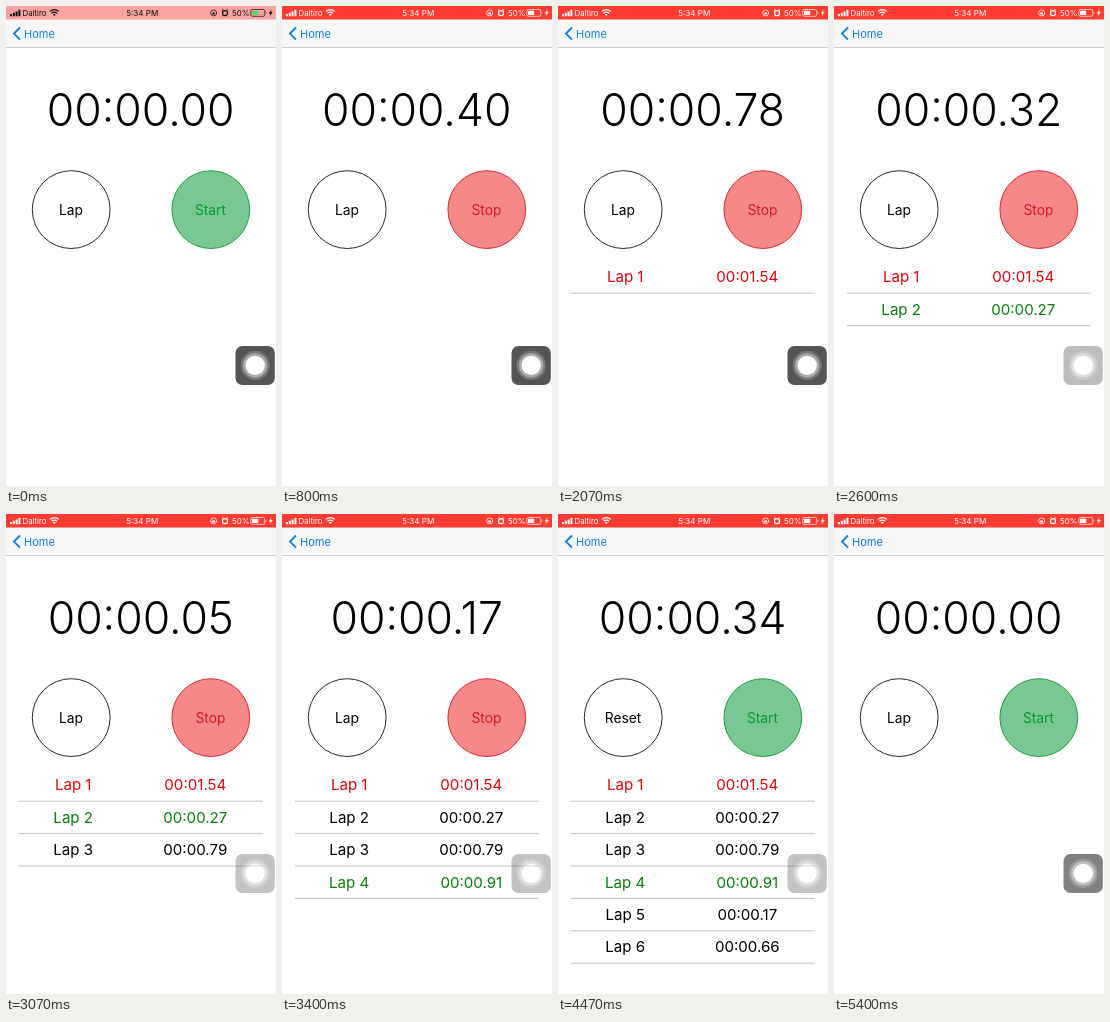
An HTML page for the animation above (5.47 s loop, 270 px wide and 480 px high).

```html
<!DOCTYPE html>
<html lang="en">
<head>
<meta charset="utf-8">
<title>Stopwatch</title>
<style>
  html, body { margin: 0; width: 100%; height: 100%; overflow: hidden; background: #fff; }
  svg { display: block; width: 100vw; height: 100vh; font-family: Inter, Roboto, "Liberation Sans", sans-serif; }
  .mid { text-anchor: middle; }
</style>
</head>
<body>
<svg viewBox="0 0 270 480">
  <rect y="13" width="270" height="28.5" fill="#f7f7f7"/>
  <path d="M0 41.5H270" stroke="#c4c4c6" stroke-width=".8"/>
  <path d="M14 21.5L8 27.6L14 33.7" fill="none" stroke="#0f7fe0" stroke-width="1.9"/>
  <text x="18" y="31.5" font-size="11" fill="#0f7fe0">Home</text>

  <rect id="bar" width="270" height="13.5"/>
  <g id="status" font-size="8.1">
    <path d="M4 8h2v2.2h-2zM6.8 6.8h2v3.4h-2zM9.6 5.4h2v4.8h-2zM12.4 3.8h2v6.4h-2z"/>
    <text x="16.5" y="9.9" font-size="7.8">Daltiro</text>
    <g fill="none" stroke="currentColor" stroke-width="1.2">
      <path d="M43.8 5.4Q48.3 1.7 52.8 5.4M45.5 7.3Q48.3 5 51.1 7.3"/>
      <circle cx="207.6" cy="6.9" r="3" stroke-width=".8"/>
      <circle cx="219" cy="7.1" r="2.5"/>
      <path d="M215.8 4.4l1.6-1.3M222.2 4.4l-1.6-1.3M217 9.4l-.9 1M221 9.4l.9 1" stroke-width=".9"/>
      <rect x="244.8" y="3.5" width="14" height="6.8" rx="1.6" stroke-width=".7"/>
    </g>
    <path d="M46.9 8.4Q48.3 7.3 49.7 8.4L48.3 10ZM206.3 6.5h2.6v2h-2.6zM259.8 5.6q1.3 1.2 0 2.6zM265.7 3l-3 4.4h1.8l-.8 3.2l3-4.5h-1.8z"/>
    <text class="mid" x="136.3" y="9.9">5:34 PM</text>
    <text x="226" y="9.9" font-size="7.9">50%</text>
    <rect id="charge" x="246" y="4.7" width="6.2" height="4.4" rx=".6"/>
  </g>

  <text id="clock" class="mid" x="134.7" y="120" font-size="44.5" font-weight="350"></text>
  <g class="mid" font-size="13.8">
    <circle cx="65.2" cy="203.6" r="38.9" fill="#fff" stroke="#111" stroke-width=".9"/>
    <text id="left" x="65" y="208.6"></text>
    <circle id="disc" cx="204.8" cy="203.6" r="38.9" stroke-width=".9"/>
    <text id="right" x="204.5" y="208.6"></text>
  </g>
  <g id="rows" class="mid" font-size="15.1"></g>

  <g id="touch">
    <rect x="229.5" y="340" width="39.3" height="39" rx="7" fill="#555"/>
    <circle cx="249.2" cy="359.4" r="14.6" fill="#777"/>
    <circle cx="249.2" cy="359.4" r="12.2" fill="#aaa"/>
    <circle cx="249.2" cy="359.4" r="9.6" fill="#fff"/>
  </g>
</svg>
<script>
const LOOP = 5470, STOP = 4440, RESET = 4980;
// When each lap begins, and the length stored for each finished one.
const begins = [397, 1993, 2275, 3066, 3230, 3435, 4100];
const laps = [1540, 270, 790, 91, 170, 665];
const $ = id => document.getElementById(id);
const clamp = x => Math.min(1, Math.max(0, x));
const mix = (a, b, k) => a + (b - a) * k;

// The app takes the first two digits of the unpadded milliseconds.
function format(ms) {
  const sec = String(Math.floor(ms / 1000)).padStart(2, '0');
  const part = String(Math.floor(ms % 1000)).padStart(2, '0').slice(0, 2);
  return `00:${sec}.${part}`;
}

function rowColor(i, done) {
  const shown = laps.slice(0, done);
  if (laps[i] === Math.max(...shown)) return '#df0510';
  return laps[i] === Math.min(...shown) ? '#087f0d' : '#000';
}

const rows = laps.map((ms, i) => {
  const g = document.createElementNS('http://www.w3.org/2000/svg', 'g');
  const y = 276.4 + 32.4 * i;
  g.innerHTML = `<text x="67.2" y="${y}">Lap ${i + 1}</text>
    <text x="189.3" y="${y}">${format(ms)}</text>
    <path d="M13 ${y + 10.8}H257" stroke="#bcbcbc" stroke-width=".9"/>`;
  $('rows').append(g);
  return g;
});

function drawStatus(t) {
  const k = clamp(t / 140), ink = t < 70 ? '#111' : '#fff';
  $('bar').setAttribute('fill', `rgb(${mix(250, 255, k)},${mix(164, 59, k)},${mix(164, 50, k)})`);
  $('status').setAttribute('fill', ink);
  $('status').setAttribute('color', ink);
  $('charge').setAttribute('fill', t < 70 ? '#4cd964' : '#fff');
}

function drawWatch(t) {
  const cleared = t < begins[0] || t >= RESET;
  const running = !cleared && t < STOP;
  const now = Math.min(t, STOP);
  const done = cleared ? 0 : begins.filter(b => b <= now).length - 1;
  const elapsed = cleared ? 0 : Math.min(now - begins[done], laps[done] ?? Infinity);

  $('clock').textContent = format(elapsed);
  $('left').textContent = cleared || running ? 'Lap' : 'Reset';
  $('right').textContent = running ? 'Stop' : 'Start';
  $('right').setAttribute('fill', running ? '#d91c24' : '#0b9930');
  $('disc').setAttribute('fill', running ? '#f58888' : '#79c793');
  $('disc').setAttribute('stroke', running ? '#d91c24' : '#0b9930');
  rows.forEach((row, i) => {
    row.style.display = i < done ? '' : 'none';
    row.setAttribute('fill', rowColor(i, done));
  });
}

function frame(time) {
  const t = time % LOOP;
  drawStatus(t);
  drawWatch(t);
  const dim = clamp((t - 2270) / 350) - clamp((t - 5300) / 170);
  $('touch').setAttribute('opacity', 1 - .65 * dim);
  requestAnimationFrame(frame);
}

const origin = performance.now();
const tick = () => frame(performance.now() - origin);
(function run() {
  const t = (performance.now() - origin) % LOOP;
  drawStatus(t);
  drawWatch(t);
  const dim = clamp((t - 2270) / 350) - clamp((t - 5300) / 170);
  $('touch').setAttribute('opacity', 1 - .65 * dim);
  requestAnimationFrame(run);
})();
</script>
</body>
</html>
```
